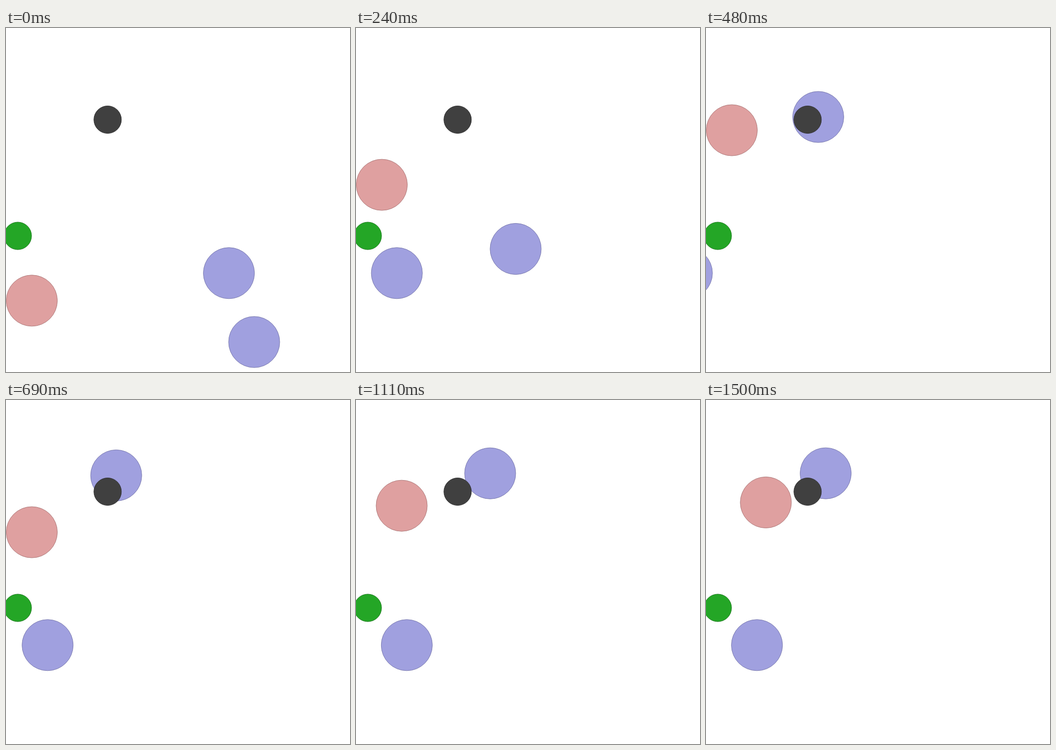
An HTML page for the animation above (1530 ms loop, 700x700 px).

```html
<!DOCTYPE html>
<html lang="en">
<head>
<meta charset="utf-8">
<title>Circles</title>
<style>
  html, body { margin: 0; width: 100%; height: 100%; overflow: hidden; background: #fff; }
  svg { display: block; width: 100vw; height: 100vh; }
  .pink { fill: #dfa0a0; stroke: #ae7a7a; }
  .blue { fill: #a0a0df; stroke: #7a7aae; }
  .green { fill: #24a626; stroke: #1b781c; }
  .dark { fill: #404040; stroke: #303030; }
</style>
</head>
<body>
<svg viewBox="0 0 700 700">
  <circle id="pink" class="pink" r="52"/>
  <circle id="low" class="blue" cy="498.8" r="52"/>
  <circle id="high" class="blue" r="52"/>
  <circle class="green" cx="24" cy="423" r="28"/>
  <circle class="dark" cx="206.8" cy="186.5" r="28"/>
</svg>
<script>
const STEP = 30, STEPS = 51, KEEP = 0.75;

const soft = x => Math.log(1 + Math.exp(x));

// A coordinate lags behind its goal, closing a quarter of the gap per step.
// Goal changes add up; the first one starts softly, later ones at once.
function chase(start, ...goals) {
  return step => {
    let value = start, last = start;
    goals.forEach(([from, goal], i) => {
      const spent = i ? Math.max(0, step - from) : soft(step - from) - soft(-from);
      value += (goal - last) * (1 - KEEP ** spent);
      last = goal;
    });
    return value;
  };
}

const moves = {
  pink: {
    cx: chase(52.5, [0, 52.5], [34, 122.5]),
    cy: chase(554.8, [4.3, 195.6], [16, 278.5], [29, 208.3])
  },
  low: {
    cx: chase(453.6, [3.4, -52.5], [16, 103.7])
  },
  high: {
    cx: chase(505, [4.6, 217.5], [21.9, 237], [29, 286], [36.3, 242.8]),
    cy: chase(639, [6.5, 149.2])
  }
};

function draw(ms) {
  const step = Math.floor(ms / STEP) % STEPS;
  for (const [id, axes] of Object.entries(moves)) {
    const node = document.getElementById(id);
    for (const axis in axes) node.setAttribute(axis, axes[axis](step).toFixed(2));
  }
}

const begin = performance.now();
function tick() {
  draw(performance.now() - begin);
  requestAnimationFrame(tick);
}
tick();
</script>
</body>
</html>
```
